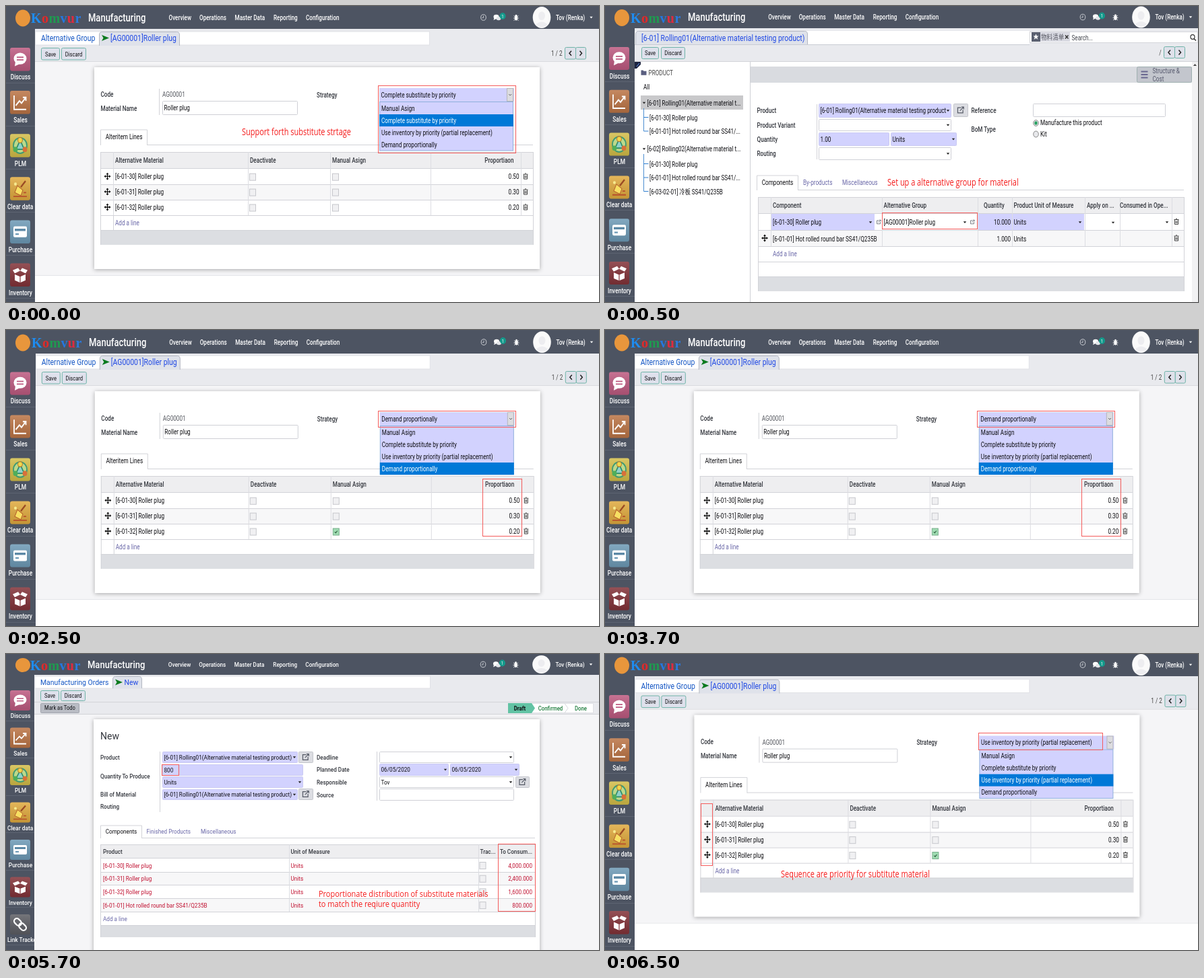
Recreate the animation shown at these times as an HTML page. Size 880 px wide and 440 px high, loop 8 s.

```html
<!DOCTYPE html>
<html lang="en">
<head>
<meta charset="utf-8">
<title>Substitute materials</title>
<style>
html, body { margin: 0; width: 100%; height: 100%; overflow: hidden; background: #fff; }
svg { display: block; width: 100vw; height: 100vh; }
svg svg { width: auto; height: auto; }
text { font-family: Roboto, "Noto Sans CJK SC", sans-serif; white-space: pre; }
.note { font-family: "Open Sans", "Noto Sans", sans-serif; }
.word { font-family: "Liberation Serif", "Noto Serif", serif; font-weight: 700; }
.sheet { filter: drop-shadow(0 1px 3px rgba(0,0,0,.32)); }
</style>
</head>
<body>
<svg id="stage" viewBox="0 0 880 440" preserveAspectRatio="none"></svg>
<script>
const LAV = '#d2d2fe', LINE = '#d2d3d8', INK = '#0e0e12', LABEL = '#34373e', LINK = '#6a68a8',
  RED = '#f41c1c', BLUE = '#0078d7', NAV = '#4d5462', PANEL = '#e9eaee', FOOT = '#dcdee2',
  CRUMB = '#1456c4', ACTIVE = '#1f48e4';

let ky = 1.25;

const box = (x, y, w, h, fill = 'none', stroke = '', r = 0) => stroke
  ? `<rect x="${x + .5}" y="${y + .5}" width="${w - 1}" height="${h - 1}" rx="${r}" fill="${fill}" stroke="${stroke}"/>`
  : `<rect x="${x}" y="${y}" width="${w}" height="${h}" rx="${r}" fill="${fill}"/>`;
const path = (d, fill = 'none', stroke = 'none', w = 1) =>
  `<path d="${d}" fill="${fill}" stroke="${stroke}" stroke-width="${w}"/>`;
const oval = (x, y, rx, ry, fill = 'none', stroke = 'none', w = 1) =>
  `<ellipse cx="${x}" cy="${y}" rx="${rx}" ry="${ry}" fill="${fill}" stroke="${stroke}" stroke-width="${w}"/>`;
const hline = (x, y, w, color = LINE) => box(x, y, w, 1, color);
const vline = (x, y, h, color = LINE) => box(x, y, 1, h, color);
const group = (x, y, body, s = '1') => `<g transform="translate(${x} ${y}) scale(${s})">${body}</g>`;

// y is the middle of the capitals.
function text(x, y, str, { size = 8.17, fill = INK, weight = 400, anchor = 'start', cls = '' } = {}) {
  return `<text class="${cls}" transform="translate(${x} ${y + size * ky * .355}) scale(1 ${ky})" font-size="${size}" ` +
    `font-weight="${weight}" fill="${fill}" text-anchor="${anchor}">${str.replace(/&/g, '&amp;')}</text>`;
}
const label = (x, y, str) => text(x, y, str, { weight: 500, fill: LABEL });
const right = (x, y, str, fill = INK) => text(x, y, str, { anchor: 'end', fill });
const note = (x, y, str) => text(x, y, str, { size: 10.98, fill: RED, cls: 'note' });
const crumb = (x, y, str, fill = CRUMB) => text(x, y, str, { size: 10.45, fill });
const frame = (x, y, w, h) => box(x, y, w, h, 'none', '#f45c5c');

const caret = (x, y, fill = '#222') => path(`M${x - 2.2} ${y - 1.2}h4.4l-2.2 2.8z`, fill);
const arrow = (x, y) => path(`M${x} ${y - 4.5}l11 4.5l-11 4.5l2.5-4.5z`, '#0a7a1e');
const button = (x, y, w, h, str) => box(x, y, w, h, '#dfe1ec', '#6fb3a8', 2) +
  text(x + w / 2, y + h / 2, str, { size: 7.6, anchor: 'middle' });
const check = (x, y, on) => box(x, y - 5, 10, 11, on ? '#9fdcb2' : '#f0f0f2', on ? '#78ad8c' : '#c6c7cc') +
  (on ? path(`M${x + 3} ${y + .5}l1.5 1.7l2.5-3.2`, 'none', '#2c5a3c', 1.1) : '');
const move = (x, y) => path(`M${x - 4} ${y}h8M${x} ${y - 4.5}v9`, 'none', '#111', 1.3) +
  path(`M${x} ${y - 5.5}l2 2.5h-4zM${x} ${y + 5.5}l2-2.5h-4zM${x - 5} ${y}l2.5-2v4zM${x + 5} ${y}l-2.5-2v4z`, '#111');
const trash = (x, y) => path(`M${x - 3.5} ${y - 3}h7M${x - 1} ${y - 4.2}h2M${x - 2.5} ${y - 2.5}v6.5h5v-6.5M${x - .8} ${y - 1}v3.5M${x + .9} ${y - 1}v3.5`, 'none', '#333', .9);
const opener = (x, y, s = 1, color = '#555a66') => group(x, y,
  path('M1 -3h-4.5v7h7v-4M1.5 -4h3v3M4.3 -3.8L-.5 1', 'none', color, 1.1), s);
const openButton = (x, y, w, h) => box(x, y, w, h, '#dcdde2', '#c4c6cc', 1) + opener(x + w / 2 - .7, y + h / 2 - .5, 1.1);
const field = (x, y, w, h, str = '', { fill = '#fff', drop = true } = {}) =>
  box(x, y, w, h, fill, fill === LAV ? '#cacaf2' : '#cfd0d6', 1) + text(x + 2.5, y + h / 2, str) +
  (drop ? caret(x + w - 5, y + h / 2) : '');

function pager(y, h, str) {
  const mid = y + h / 2;
  return text(825.5, mid, str, { anchor: 'end', fill: '#444' }) +
    box(829, y, 17, h, '#dfe1ea', '#6fb3a8', 2) + box(845, y, 16, h, '#dfe1ea', '#6fb3a8', 2) +
    path(`M839 ${mid - 3.5}l-3 3.5l3 3.5M851.5 ${mid - 3.5}l3 3.5l-3 3.5`, 'none', '#222', 1.5);
}

// App tiles, each drawn on a 30 by 30 square.
const W = '#fff';
const apps = [
  ['Discuss', '#bd5a80', oval(15, 14, 9.5, 7.5, W) + path('M8 18l-1 6l7-3z', W) + path('M10 12.3h10M10 15.8h10', 'none', '#bd5a80', 1.5)],
  ['Sales', '#bb7445', path('M6 6v18h18M8.5 19l5.5-6l3 3l6-7M19 8.500h4.5v4.5', 'none', W, 1.8)],
  ['PLM', '#d3bd48', oval(15, 15, 10, 10, '#bcd98a', '#3f9a74', 1.8) + path('M15 8L9 20h12z', '#8fd0c8', '#2b8a6a', 1.6) +
    oval(15, 8, 3.4, 3.4, '#f0d84a', '#b5702c') + oval(8, 20, 3.4, 3.4, '#4fae5a') + oval(22, 20, 3.4, 3.4, '#d8703a')],
  ['Clear data', '#e0aa3e', path('M23 5l-7 8', 'none', '#9a4a24', 2.2) + path('M11 11l8 6l-3 7l-9-4z', '#f7df62', '#b8622c') +
    path('M5 25h20M20 20h4', 'none', '#b8502c', 1.6) + oval(8, 9, 2, 2, '#f7ea90')],
  ['Purchase', '#6d9ab6', box(5, 8, 20, 14, W, '', 2) + box(7, 11, 16, 3, '#5c89a6') + box(8, 17, 5, 2, '#6d9ab6')],
  ['Inventory', '#823238', path('M7 14l8 3l8-3v8l-8 3l-8-3zM7 13l-3-4l8-3l3 3.5zM23 13l3-4l-8-3l-3 3.5z', W) +
    path('M15 16v9M7 13.5l8 3l8-3', 'none', '#823238', 1.2)],
  ['Link Tracker', '#5c5d63', '<g fill="none" stroke="#fff" stroke-width="2.2" transform="rotate(45 15 15)">' +
    '<rect x="4" y="11" width="12" height="8" rx="4"/><rect x="14" y="11" width="12" height="8" rx="4"/></g>']
];

function sidebar({ width, top, pitch, tall, count = 6 }) {
  const tiles = apps.slice(0, count).map(([name, color, glyph], i) => {
    const y = top + i * pitch, ly = y + tall + pitch * .143;
    const str = { size: 8.4, weight: 500, fill: W };
    return group(6, y, box(0, 0, 30, 30, color, '', 3) + box(0, 0, 30, 30, 'url(#shade)', '', 3) + glyph, `1 ${tall / 30}`) +
      (name.length > 9 ? text(2, ly, name, str) : text(21.5, ly, name, { ...str, anchor: 'middle' })) +
      hline(0, Math.round(ly + pitch * .125), width, '#5d6472');
  }).join('');
  return `<svg width="${width}" height="440" style="width:${width}px;height:440px">${box(0, 0, width, 440, NAV)}${tiles}</svg>`;
}

function navbar({ h, y, dx = 0, menu = true, ry = 16 }) {
  const tints = ['#1e8cf0', '#e02a2a', '#1f9a50', '#2478e0', '#e02a40', '#2a7ae0'];
  const word = [...'Komvur'].map((c, i) => `<tspan fill="${tints[i]}">${c}</tspan>`).join('');
  const links = [[241.5, 'Overview'], [287, 'Operations'], [339.5, 'Master Data'], [397, 'Reporting'], [445, 'Configuration']];
  const white = { fill: W, weight: 500 };
  let s = box(0, 0, 880, h, NAV) + oval(25, y + 1, 11, ry * .78, '#e8963c') +
    `<text class="word" x="${37 + dx}" y="${y + 8}" font-size="20" letter-spacing=".4">${word}</text>`;
  if (menu) s += text(122 + dx, y, 'Manufacturing', { size: 13, ...white }) +
    links.map(([x, str]) => text(x + dx * .7, y, str, white)).join('');
  return s + group(dx / 2, y,
    oval(708.5, 0, 3.8, 4.3, 'none', '#c9ccd2') + path('M708.5 -2.500v3h-2', 'none', '#c9ccd2', .9) +
    oval(727.5, -1, 4, 3.2, W) + oval(731, 1.5, 3.5, 2.8, '#e4e6ea') + path('M724.5 1l-1 3l4-2z', W) +
    oval(737, -2, 4.5, 5, '#159a8c') + text(737, -2, '1', { size: 6, fill: W, anchor: 'middle' }) +
    oval(757, .8, 2.2, 3.6, W) + oval(757, -2.8, 1.5, 1.5, W) +
    path('M753.5 -2.500l2 1.500M760.5 -2.500l-2 1.500M753 1h8M753.5 4.500l2-1.500M760.5 4.500l-2-1.500', 'none', W, .8) +
    oval(795, 0, 13.3, ry, '#fafafa') + oval(795, -ry * .15, 5, ry * .4, '#ededf0') +
    path(`M786 ${ry * .65}q9 -${ry * .5} 18 0q-9 ${ry * .5} -18 0z`, '#ededf0') +
    text(816, 0, 'Tov (Renka)', white) + caret(868.5, 0, W));
}

const tabShape = (x, y, w, h) => path(`M${x + .5} ${y + h}v${5 - h}q0-4.500 4-4.500h${w - 9}q4 0 4 4.500v${h - 5}`, '#dfe2ea', '#b4b8c2');
const pageTab = (x, y, w, h, str) => path(`M${x + .5} ${y + h + 1}v${-h}h${w}v${h}`, W, LINE) + text(x + 7.7, y + h / 2, str);

const rowsOf = [['[6-01-30] Roller plug', '0.50'], ['[6-01-31] Roller plug', '0.30'], ['[6-01-32] Roller plug', '0.20']];
const strategies = ['Manual Asign', 'Complete substitute by priority', 'Use inventory by priority (partial replacement)', 'Demand proportionally'];

function strategyList(pick) {
  return box(554, 122, 200, 20, LAV) + text(556.5, 132, strategies[pick]) +
    box(743, 122, 10, 20, '#dcdce0', '#b6b6bc') + path('M746.2 131l2 2l2-2', 'none', '#555', .9) +
    box(554, 142, 199, 73.5, LAV, '#8fb0dc') +
    strategies.map((str, i) => {
      const y = 152 + i * 18;
      return (i === pick ? box(554, y - 9, 199, 18, BLUE) : '') + text(557, y, str, { fill: i === pick ? W : INK });
    }).join('');
}

function groupScene({ dx, dy, nav, side, pick, checked, extra }) {
  ky = 1.25;
  const body = box(40, 30, 842, 53, PANEL) + box(43, 37.5, 586, 21, W, '#e0e1e6') +
    crumb(52, 47.5, 'Alternative Group') + tabShape(138, 38, 120, 21) + arrow(142, 47.5) + crumb(155, 47.5, '[AG00001]Roller plug', ACTIVE) +
    button(52, 62, 28, 18.5, 'Save') + button(82, 62, 37, 18.5, 'Discard') + pager(61, 18.5, '1 / 2') +
    box(40, 82, 842, 318, '#f5f5f7') + hline(40, 82, 842, '#d9dade') + hline(40, 400, 842, '#e3e4e8') +
    '<rect class="sheet" x="131" y="91" width="661" height="300" fill="#fff"/>' +
    label(140.5, 131, 'Code') + label(140.5, 152, 'Material Name') + vline(227, 123, 39) +
    text(232, 131.5, 'AG00001', { fill: '#55585f' }) + field(232, 141, 201, 21, 'Roller plug', { drop: false }) +
    label(461, 132, 'Strategy') +
    hline(209, 206, 573) + pageTab(140, 183, 69, 23, 'Alteritem Lines') +
    box(140, 217, 642, 24, '#eeeef0') + box(140, 265, 642, 23, '#f7f7f8') + box(140, 333, 642, 22, FOOT) +
    [217, 241, 265, 288, 311, 333].map(y => hline(140, y, 642)).join('') +
    vline(140, 217, 138) + vline(782, 217, 138) +
    [159, 359, 481, 630, 764].map(x => vline(x, 217, 94, '#dcdde2')).join('') + vline(159, 311, 22) +
    [[162, 'Alternative Material'], [362, 'Deactivate'], [484, 'Manual Asign']].map(([x, str]) => label(x, 229.5, str)).join('') +
    text(753.5, 229.5, 'Proportiaon', { weight: 500, fill: LABEL, anchor: 'end' }) +
    rowsOf.map(([name, part], i) => {
      const y = 253.7 + i * 22.9;
      return move(150.5, y - .5) + text(162, y, name) + check(361, y) + check(484, y, checked && i === 2) +
        right(761.5, y, part) + trash(771, y - .5);
    }).join('') +
    text(162, 322.7, 'Add a line', { fill: LINK }) + strategyList(pick) + extra();
  return group(dx, dy, body) + sidebar(side) + navbar(nav);
}

function bomScene() {
  ky = 1.25;
  const tree = [[62.5, 144, '[6-01] Rolling01(Alternative material t...', 1], [66, 166, '[6-01-30] Roller plug'],
    [66, 186.5, '[6-01-01] Hot rolled round bar SS41/...'], [62.5, 212.5, '[6-02] Rolling02(Alternative material t...', 1],
    [66, 235, '[6-01-30] Roller plug'], [66, 255, '[6-01-01] Hot rolled round bar SS41/...'], [66, 276, '[6-03-02-01] 冷板 SS41/Q235B']];
  const heads = [[249, 'Component'], [413.5, 'Alternative Group'], [562, 'Quantity'], [606.5, 'Product Unit of Measure'], [715, 'Apply on ...'], [764, 'Consumed in Ope...']];
  const product = '[6-01] Rolling01(Alternative material testing product';
  return box(0, 0, 880, 440, W) + box(44, 33, 836, 49, PANEL) + box(44, 37, 586, 20, W) +
    tabShape(45, 37, 256, 20) + crumb(54, 47, product + ')', ACTIVE) + hline(44, 57, 586, '#c9ccd4') +
    box(630, 38, 250, 17, W, '#d5d6db') + box(633, 39, 57, 14, '#d9dae2') + box(633, 39, 13, 14, '#5a6070') +
    path('M639.5 41.5l1.2 3h2.8l-2.2 2l.9 3.2l-2.7-2l-2.7 2l.9-3.2l-2.2-2h2.8z', W) +
    text(647, 46, '物料清单', { size: 8.6, fill: '#5c5e68' }) + path('M683 43.5l4.5 5M687.5 43.5l-4.5 5', 'none', '#333', 1.4) +
    text(692.5, 47, 'Search...', { fill: '#44474e' }) + oval(872, 46, 3, 3.3, 'none', '#333', 1.2) + path('M874 48.5l3 3', 'none', '#333', 1.5) +
    button(54, 61, 26, 18, 'Save') + button(83, 61, 36, 18, 'Discard') + pager(60, 18, '/') + hline(44, 82, 836) +
    box(44, 83, 9, 10, '#1c2440') + path('M53 87v6h-6z', W) + path('M47 90l4-5', 'none', '#6fa0ff') +
    path('M53.5 95.5h3l1 1.2h4v6h-8z', '#5a5f80') + text(64.5, 99, 'PRODUCT', { fill: '#444' }) + text(57, 120, 'All') +
    box(53, 133, 152, 21, '#c9c9cb') +
    path('M57.5 152v34M57.5 220v55.5', 'none', '#4d8fd0') + path('M57.5 165.5h7M57.5 186h7M57.5 234.5h7M57.5 255h7M57.5 275.5h7', 'none', '#2f7fd0', 1.2) +
    tree.map(([x, y, str, open]) => (open ? caret(58, y) : '') + text(x, y, str, { size: 8.05 })).join('') +
    vline(215, 83, 357, '#cfd0d6') + box(216, 90, 655, 24, '#d9dbe0') +
    box(789, 90, 82, 24, '#c3c6cd', '#9fb0b0', 2) + path('M795.5 97.5h10M795.5 102h10M795.5 106.500h10', 'none', '#6a6890', 1.8) +
    text(812.5, 96.5, 'Structure &', { fill: '#55586c' }) + text(812.5, 108, 'Cost', { fill: '#55586c' }) +
    box(871, 83, 9, 357, '#f2f2f3') + path('M873 89l2.5-3l2.5 3z', '#444') +
    [['Product', 155.5], ['Product Variant', 177], ['Quantity', 198.5], ['Routing', 219.5]].map(([str, y]) => label(225.5, y, str)).join('') +
    vline(314, 146, 82) + field(317, 145, 197, 21, product, { fill: LAV }) + openButton(517, 145, 22, 20) +
    field(317, 168, 197, 18) + field(317, 188, 105, 20, '1.00', { fill: LAV, drop: false }) +
    field(424, 188, 98, 20, 'Units', { fill: LAV }) + field(317, 210, 197, 19) +
    label(543.5, 155.5, 'Reference') + label(543.5, 183.5, 'BoM Type') + field(635, 145, 197, 20, '', { drop: false }) +
    [[174, 'Manufacture this product', 1], [190.5, 'Kit']].map(([y, str, on]) =>
      oval(639.5, y, 3.8, 4.5, '#e8e9ec', '#888') + (on ? oval(639.5, y, 2.2, 2.7, '#27a060') : '') + text(646, y - .5, str)).join('') +
    hline(225, 273, 634) + pageTab(225, 251, 61, 22, 'Components') +
    text(294, 262, 'By-products', { fill: LINK }) + text(352, 262, 'Miscellaneous', { fill: LINK }) +
    note(419, 262, 'Set up a alternative group for material') +
    box(227, 284, 632, 25, '#eeeef0') + box(227, 333, 632, 24, '#f7f7f8') + box(227, 402, 632, 22, FOOT) +
    [284, 308, 333, 357, 380, 402].map(y => hline(227, y, 632)).join('') +
    [246, 411, 553, 604, 712, 764, 841].map(x => vline(x, 284, 73, '#dcdde2')).join('') + vline(227, 284, 140) + vline(859, 284, 140) +
    heads.map(([x, str]) => label(x, 296, str)).join('') +
    box(247, 309, 153, 24, LAV) + text(249, 321.5, rowsOf[0][0]) + caret(394, 321.5) + opener(406, 321, .7) +
    frame(411, 307, 142, 25) + text(413.5, 321.5, '[AG00001]Roller plug') + caret(534, 321.5) + opener(545, 321, .7) +
    box(554, 309, 50, 24, LAV) + right(602, 321.5, '10.000') + box(605, 309, 106, 24, LAV) + text(606.5, 321.5, 'Units') +
    caret(705, 321.5) + caret(754, 322) + caret(834, 321.5) + trash(848, 320.5) +
    move(237, 345) + text(249, 346, '[6-01-01] Hot rolled round bar SS41/Q235B') + right(602, 346, '1.000') + text(606.5, 346, 'Units') + trash(848, 345) +
    text(249, 368.5, 'Add a line', { fill: LINK }) +
    sidebar({ width: 44, top: 61, pitch: 63.8, tall: 34 }) + navbar({ h: 33, y: 16.5, dx: 1 });
}

function orderScene() {
  ky = 1.1;
  const WINE = '#c01030', GREEN = '#1f7d3e', product = '[6-01] Rolling01(Alternative material testing product)';
  const lines = [...rowsOf.map(r => r[0]), '[6-01-01] Hot rolled round bar SS41/Q235B'];
  const amounts = ['4,000.000', '2,400.000', '1,600.000', '800.000'];
  const lav = { fill: LAV };
  const step = (x, str, fill, weight = 500) => text(x, 80.5, str, { size: 7.8, weight, fill, anchor: 'middle' });
  return box(0, 0, 880, 440, '#f5f5f7') + box(42, 31, 838, 58, PANEL) + box(42, 32.5, 588, 19, W, '#e0e1e6') +
    crumb(51, 42, 'Manufacturing Orders') + tabShape(158, 33, 44, 18) + arrow(162, 42) + crumb(175.5, 42, 'New', ACTIVE) +
    button(51, 54, 28, 16, 'Save') + button(81, 54, 37, 16, 'Discard') + hline(42, 71, 838) +
    box(51, 73, 58, 15, '#b9bcc4', '#a0a4ad', 1) + text(80, 80.5, 'Mark as Todo', { size: 7.6, anchor: 'middle' }) +
    box(745, 73, 127, 15, W, '#dfe0e4') + path('M745 73h35l5 7.5l-5 7.5h-35z', '#62c3a4') + path('M829 73.5l5 7l-5 7', 'none', '#d5d7dc') +
    step(762.5, 'Draft', INK, 700) + step(808, 'Confirmed', GREEN) + step(853, 'Done', GREEN) +
    hline(42, 89, 838) + '<rect class="sheet" x="130" y="97" width="662" height="360" fill="#fff"/>' +
    text(140, 121.5, 'New', { size: 14, fill: LABEL }) +
    [[140, 153.5, 'Product'], [140, 182, 'Quantity To Produce'], [140, 209, 'Bill of Material'], [140, 227, 'Routing'],
      [461, 153.5, 'Deadline'], [461, 172, 'Planned Date'], [461, 190.5, 'Responsible'], [461, 209.5, 'Source']].map(a => label(...a)).join('') +
    vline(228, 145, 90) + vline(550, 145, 73) +
    field(232, 145, 201, 17, product, lav) + openButton(434, 145, 22, 17) +
    field(232, 164, 209, 17, '800', { fill: LAV, drop: false }) + frame(231, 164, 26, 17) +
    field(232, 182, 209, 17, 'Units', lav) + field(232, 201, 201, 16, product, lav) + openButton(434, 200, 22, 17) +
    field(554, 145, 200, 17) + field(554, 163, 103, 18, '06/05/2020', lav) + field(659, 163, 103, 18, '06/05/2020', lav) +
    field(554, 182, 200, 17, 'Tov') + openButton(756, 182, 21, 17) + field(554, 200, 200, 18, '', { drop: false }) +
    hline(140, 273, 645) + pageTab(140, 254, 61, 19, 'Components') +
    text(208.5, 264, 'Finished Products', { fill: LINK }) + text(289, 264, 'Miscellaneous', { fill: LINK }) +
    box(140, 283, 645, 20, '#eeeef0') + box(140, 324, 645, 19, '#f7f7f8') + box(140, 363, 645, 20, '#f7f7f8') + box(140, 403, 645, 18, FOOT) +
    [283, 303, 324, 343, 363, 383, 403].map(y => hline(140, y, 645)).join('') +
    [420, 701, 730].map(x => vline(x, 283, 100, '#dcdde2')).join('') + vline(140, 283, 138) + vline(785, 283, 138) +
    [[144, 'Product'], [422.5, 'Unit of Measure'], [703.5, 'Trac...'], [733, 'To Consum...']].map(([x, str]) => label(x, 293.5, str)).join('') +
    lines.map((name, i) => {
      const y = 314.5 + i * 19.7;
      return text(144, y, name, { fill: WINE }) + text(422.5, y, 'Units', { fill: WINE }) +
        check(702.5, y - .5) + right(781, y, amounts[i], WINE);
    }).join('') +
    frame(730, 282, 56, 101) + text(144, 393.5, 'Add a line', { fill: LINK }) +
    note(464, 356.5, 'Proportionate distribution of substitute materials') + note(464, 371.5, 'to match the reqiure quantity') +
    sidebar({ width: 42, top: 54, pitch: 55.5, tall: 30, count: 7 }) + navbar({ h: 31, y: 15.5, dx: -1, ry: 13.5 });
}

const scenes = [
  [0, groupScene({
    dx: 0, dy: 0, pick: 1, nav: { h: 34, y: 17 }, side: { width: 43, top: 62, pitch: 64.1, tall: 34.5 },
    extra: () => frame(552, 118, 205, 101) + note(350, 187, 'Support forth substitute strtage')
  })],
  [500, bomScene()],
  [2500, groupScene({
    dx: .8, dy: 0, pick: 3, checked: true, nav: { h: 35, y: 18, dx: 1 }, side: { width: 44, top: 62.5, pitch: 64, tall: 34 },
    extra: () => frame(551.2, 120, 205, 25) + frame(706.2, 221, 59, 86)
  })],
  [4500, orderScene()],
  [6500, groupScene({
    dx: 1.4, dy: -.4, pick: 2, checked: true, nav: { h: 33, y: 16, dx: 1, menu: false }, side: { width: 44, top: 61, pitch: 64.2, tall: 34.5 },
    extra: () => frame(552.6, 117.4, 185, 26) + frame(140.6, 222.4, 18, 93) + note(259.6, 327.5, 'Sequence are priority for subtitute material')
  })]
];

const LOOP = 8000;
const stage = document.getElementById('stage');
const shade = '<defs><linearGradient id="shade" x2="0" y2="1"><stop stop-color="#fff" stop-opacity=".15"/>' +
  '<stop offset="1" stop-opacity=".12"/></linearGradient></defs>';
stage.innerHTML = shade + scenes.map(([, body]) => `<g display="none">${body}</g>`).join('');
const layers = [...stage.children].slice(1);
let shown = -1;

function draw(t) {
  const now = scenes.findLastIndex(([start]) => t >= start);
  if (now === shown) return;
  layers.forEach((layer, i) => layer.setAttribute('display', i === now ? 'inline' : 'none'));
  shown = now;
}

const began = performance.now();
function tick() {
  draw((performance.now() - began) % LOOP);
  requestAnimationFrame(tick);
}
tick();
</script>
</body>
</html>
```
